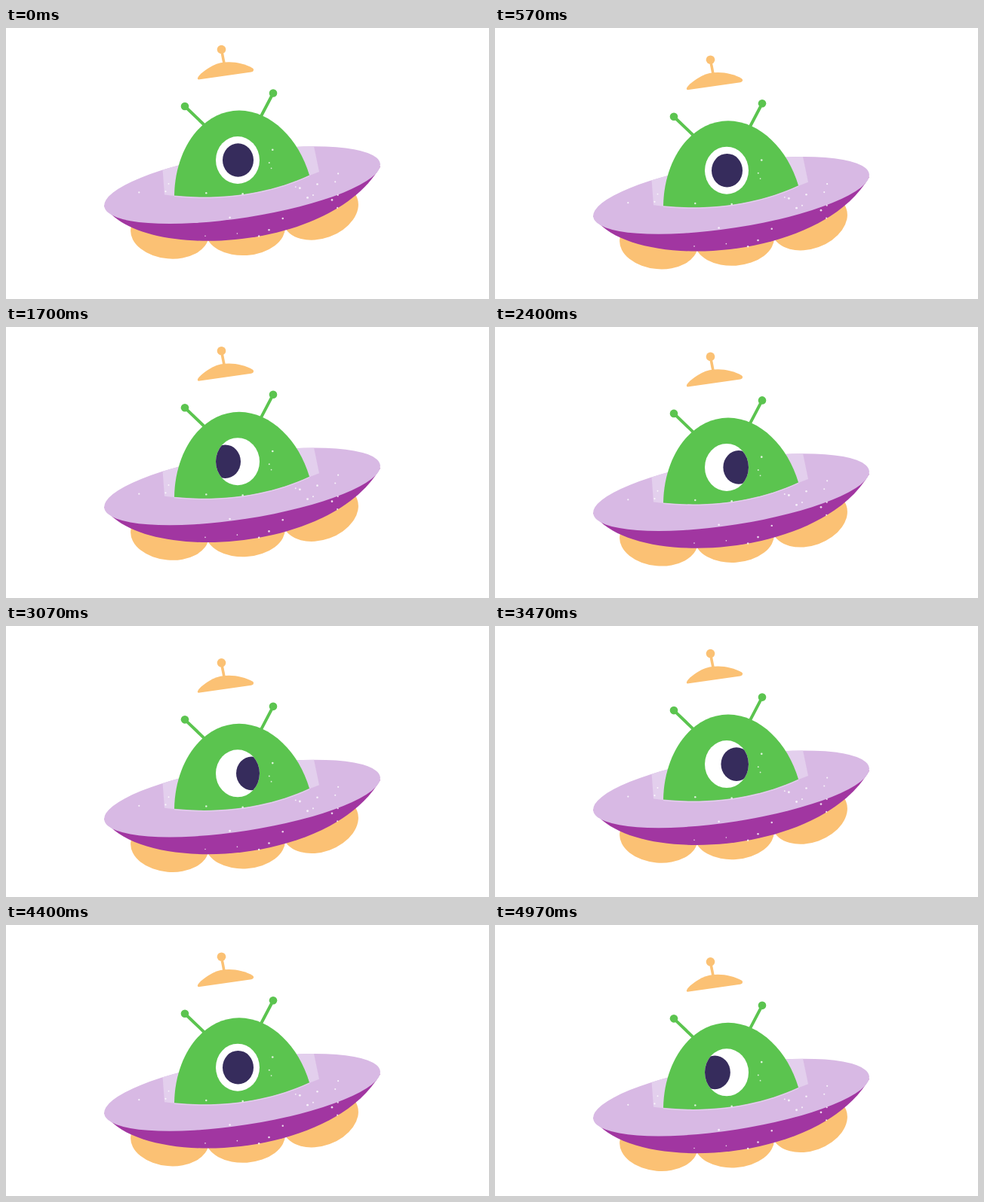
Animation of 640 by 360 pixels, one loop 5.07 s. Source, as an HTML page:

```html
<!DOCTYPE html>
<html lang="en">
<head>
<meta charset="utf-8">
<title>Alien in a flying saucer</title>
<style>
  html, body { margin: 0; width: 100%; height: 100%; overflow: hidden; background: #fff; }
  svg { display: block; width: 100vw; height: 100vh; }
</style>
</head>
<body>
<svg viewBox="0 0 640 360">
  <defs>
    <ellipse id="disc" cx="313" cy="208.700" rx="185" ry="43.2" transform="rotate(-8.9 313 208.7)"/>
    <clipPath id="discClip"><use href="#disc"/></clipPath>
    <clipPath id="eyeClip"><ellipse id="lid" cx="307" cy="175.5" rx="29" ry="31.5"/></clipPath>
  </defs>
  <g id="ship">
    <g id="lobes" fill="#fbc174">
      <ellipse cx="217" cy="272" rx="52" ry="34.5" transform="rotate(5 217 272)"/>
      <ellipse cx="317" cy="267.5" rx="53" ry="34.5" transform="rotate(-4 317 267.5)"/>
      <ellipse cx="416.5" cy="243.500" rx="52" ry="36" transform="rotate(-20 416.5 243.5)"/>
    </g>
    <g id="cap" fill="#fbc174">
      <path d="M255 68.500C250 67 262 56 274 50C290 42 312 45 327 53.500C329 55 328 58 325 58.500Z"/>
      <path d="M285.500 29L289 47" stroke="#fbc174" stroke-width="3.6"/>
      <circle cx="285.5" cy="28.5" r="5.8"/>
    </g>
    <path id="hull" fill="#a136a1" d="M130 236C176 310 430 299 496 184L313 205Z"/>
    <use href="#disc" fill="#d8b9e4"/>
    <path id="glass" clip-path="url(#discClip)" fill="#e3cfed" d="M207 180H240L223 223L210 221.500ZM380 150H406.500L415 191L402 196Z"/>
    <g id="antennae" fill="#5bc44f">
      <path d="M237 104L264 130M354 86.500L337 119" stroke="#5bc44f" stroke-width="4"/>
      <circle cx="237" cy="104" r="5.3"/>
      <circle cx="354" cy="86.5" r="5.3"/>
    </g>
    <path id="dome" fill="#5bc44f" d="M223 222.500C224 160 260 110 309 109.500C352 110 388 148 402 195.500C350 220 285 229 223 222.500Z"/>
    <path id="rim" fill="none" stroke="#eadcf0" stroke-width=".8" d="M223 223.500C285 230 350 221 402 196.500"/>
    <g id="specks" fill="#fff" fill-opacity=".8"></g>
    <g id="eye" clip-path="url(#eyeClip)">
      <rect x="270" y="140" width="75" height="72" fill="#fff"/>
      <ellipse id="pupil" cx="307.5" cy="175.5" rx="20.5" ry="22.3" fill="#362c5c"/>
    </g>
  </g>
</svg>
<script>
const el = id => document.getElementById(id);
const LOOP = 5070, TICK = 100 / 3, STEP = 80, LAST = 62;
const BOB = 1920, LOOK = 2 * BOB;

let seed = 11;
const rand = () => (seed = seed * 16807 % 2147483647) / 2147483647;

// Dust scattered over the dome, deck and hull
function dust(count) {
  let out = '';
  for (let i = 0; i < count; i++) {
    const a = 2 * Math.PI * rand(), d = Math.sqrt(rand());
    const x = 310 + 145 * d * Math.cos(a);
    const y = 222 + 65 * d * Math.sin(a);
    out += `<circle cx="${x}" cy="${y}" r="${0.8 + 0.7 * rand()}"/>`;
  }
  return out;
}

// Sine ease from 0 to 1 between times a and b
function ease(t, a, b) {
  const p = Math.min(1, Math.max(0, (t - a) / (b - a)));
  return (1 - Math.cos(Math.PI * p)) / 2;
}

// 12.5 poses a second, shown on a 30 Hz grid
function poseTime(t) {
  const shown = Math.floor((t + 4) / TICK) * TICK;
  return Math.min(LAST, Math.floor(shown / STEP + 1e-6)) * STEP;
}

function draw(time) {
  const t = poseTime(time % LOOP), u = t % LOOK;
  const bob = 10.9 * (1 - Math.cos(2 * Math.PI * t / BOB));
  const blink = ease(u, 0, 240) - ease(u, 240, 480);
  const look = -17 * ease(u, 640, 1200) + 35 * ease(u, 1840, 2520) - 18 * ease(u, 3200, LOOK);
  el('ship').setAttribute('transform', `translate(0 ${bob.toFixed(2)})`);
  el('lid').setAttribute('ry', Math.max(0.4, 31.5 * (1 - blink)));
  el('pupil').setAttribute('cx', 307.5 + look);
}

el('specks').innerHTML = dust(24);

const start = performance.now();
function run(now) {
  draw(Math.max(0, now - start));
  requestAnimationFrame(run);
}
draw(0);
requestAnimationFrame(run);
</script>
</body>
</html>
```
